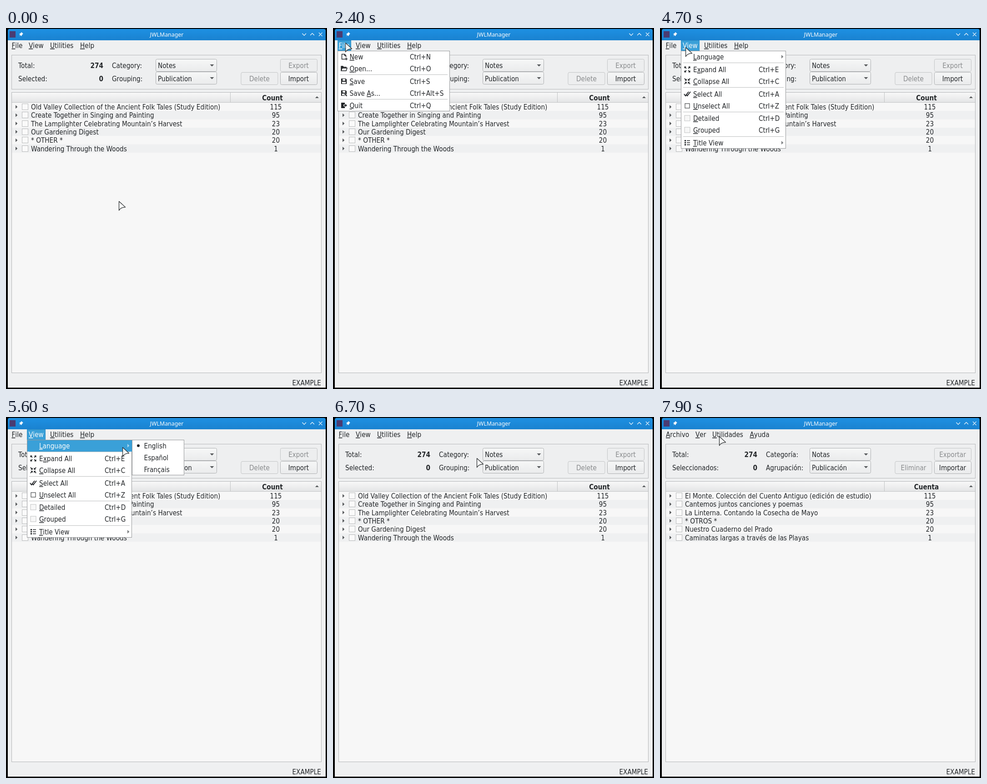
Animation of 706x793 px, one loop 8000 ms. Source, as an HTML page:

```html
<!DOCTYPE html>
<html lang="en">
<head>
<meta charset="utf-8">
<title>JWLManager</title>
<style>
  html, body { margin: 0; width: 100%; height: 100%; overflow: hidden; background: #000; }
  svg { display: block; width: 706px; height: 793px; }
  text { font: 15.2px "DejaVu Sans", sans-serif; fill: #232629; white-space: pre; }
  .bold { font-weight: bold; }
  .dim { fill: #898b8d; }
  .lit, .lit text { fill: #fcfcfc; }
  .title { font: 12.4px "Noto Sans", sans-serif; fill: #fcfcfc; }
  .line { fill: none; stroke: #232629; stroke-width: 1.5; }
  .white { fill: none; stroke: #fcfcfc; stroke-width: 1.2; }
  .off { display: none; }
</style>
</head>
<body>
<svg id="stage" viewBox="0 0 706 793">
  <defs>
    <linearGradient id="bar" x2="0" y2="1"><stop stop-color="#1e90e2"/><stop offset="1" stop-color="#1a82d0"/></linearGradient>
    <linearGradient id="face" x2="0" y2="1"><stop stop-color="#f6f7f7"/><stop offset="1" stop-color="#eaebec"/></linearGradient>
    <linearGradient id="head" x2="0" y2="1"><stop stop-color="#f8f8f8"/><stop offset="1" stop-color="#e4e5e6"/></linearGradient>
  </defs>
</svg>
<script>
const stage = document.getElementById('stage');

// The interface face is a uniformly condensed DejaVu Sans; "_" marks an access key.
const text = (x, y, s, cls = '', anchor = 'start') =>
  `<text transform="translate(${x} ${y}) scale(.9 1)" class="${cls}" text-anchor="${anchor}">${
    s.replace(/_(.)/, '<tspan text-decoration="underline">$1</tspan>')}</text>`;
const rect = (x, y, w, h, fill, stroke = 'none', r = 0) =>
  `<rect x="${x}" y="${y}" width="${w}" height="${h}" rx="${r}" fill="${fill}" stroke="${stroke}"/>`;
const path = (d, attrs = 'fill="#232629"') => `<path d="${d}" ${attrs}/>`;
const at = (x, y, body) => `<g transform="translate(${x} ${y})">${body}</g>`;
const layer = (id, body) => `<g id="${id}" class="off">${body}</g>`;

const rowTop = i => 164 + 18.3 * i;
const rowBase = i => Math.round(rowTop(i) + 15);

function frameWindow() {
  let out = path('M4 27V6Q4 2 8 2H699Q703 2 703 6V27Z', 'fill="url(#bar)"')
    + rect(4, 27, 699, 763, '#eff0f1')
    + rect(8, 7, 13, 14, '#4a3c72')
    + path('M34 9L38 13L36.5 13.6L34.6 16.5L34 18L31.7 15.7L29 18.5L31 15L28.8 13L30.5 12.4L33 10.6Z', 'fill="#fcfcfc"')
    + '<text class="title" x="353.5" y="19" text-anchor="middle">JWLManager</text>'
    + path('M651.5 12L655.8 16.3L660 12M669.3 16L673.6 11.7L677.9 16M688 10.2L695.6 17.8M695.6 10.2L688 17.8', 'class="white"')
    + rect(12.5, 59.5, 681, 75, '#eeeff0', '#b7b9bb')
    + text(214, 88, '274', 'bold', 'end') + text(214, 117, '0', 'bold', 'end');
  for (const y of [69, 97]) {
    out += rect(329.5, y - .5, 134, 27, 'url(#face)', '#aeb0b2', 3)
      + path(`M448.5 ${y + 11}h9l-4.5 4.5z`, 'fill="#55585a"');
  }
  out += rect(603.5, 68.5, 81, 27, '#edeeef', '#c3c5c6', 3)
    + rect(517, 97.5, 81, 27, '#edeeef', '#c3c5c6', 3)
    + rect(603.5, 97.5, 81, 27, 'url(#face)', '#aeb0b2', 3)
    + rect(12.5, 141.5, 681, 616, '#f7f7f7', '#b4b6b8')
    + rect(13, 142, 680, 21, 'url(#head)')
    + path('M13 163.5H693M493.5 142V163', 'stroke="#c2c4c5"')
    + path('M680 154h8l-4-4z', 'fill="#55585a"');
  ['115', '95', '23', '20', '20', '1'].forEach((n, i) => {
    const y = rowTop(i);
    if (i % 2) out += rect(13, y, 680, 18.3, '#eff0f1');
    out += path(`M21 ${y + 5.2}v8l4.3-4z`, 'fill="#55585a"')
      + rect(35.5, Math.round(y + 2) + .5, 13, 13, '#fafafa', '#b9bbbc')
      + text(593.5, rowBase(i), n, '', 'middle');
  });
  return out + text(693, 785, 'EXAMPLE', '', 'end');
}

const titles = rows => rows.map((s, i) => text(55, rowBase(i), s)).join('');

const labels = ({ bar, total, selected, category, grouping, notes, publication, exp, del, imp, count }) =>
  bar.map(([x, s]) => text(x, 44, s)).join('')
  + text(27, 88, total) + text(27, 117, selected)
  + text(233, 88, category) + text(233, 117, grouping)
  + text(334, 88, notes) + text(334, 117, publication)
  + text(643.5, 88, exp, 'dim', 'middle') + text(557.5, 117, del, 'dim', 'middle')
  + text(643.5, 117, imp, '', 'middle') + text(586, 159, count, 'bold', 'middle');

const english = {
  bar: [[12.5, '_File'], [50, '_View'], [97, '_Utilities'], [163, '_Help']],
  total: 'Total:', selected: 'Selected:', category: 'Category:', grouping: 'Grouping:',
  notes: 'Notes', publication: 'Publication', exp: 'Export', del: 'Delete', imp: 'Import', count: 'Count'
};
const spanish = {
  bar: [[13, '_Archivo'], [78, '_Ver'], [115, '_Utilidades'], [197.5, '_Ayuda']],
  total: 'Total:', selected: 'Seleccionados:', category: 'Categoría:', grouping: 'Agrupación:',
  notes: 'Notas', publication: 'Publicación', exp: 'Exportar', del: 'Eliminar', imp: 'Importar', count: 'Cuenta'
};
const englishRows = ['Old Valley Collection of the Ancient Folk Tales (Study Edition)', 'Create Together in Singing and Painting',
  'The Lamplighter Celebrating Mountain’s Harvest', 'Our Gardening Digest', '* OTHER *', 'Wandering Through the Woods'];
const swappedRows = [0, 1, 2, 4, 3, 5].map(i => englishRows[i]);
const spanishRows = ['El Monte. Colección del Cuento Antiguo (edición de estudio)', 'Cantemos juntos canciones y poemas',
  'La Linterna. Contando la Cosecha de Mayo', '* OTROS *', 'Nuestro Cuaderno del Prado',
  'Caminatas largas a través de las Playas'];

// Icons are centred on their own origin.
const floppy = path('M-6-6H4L6-4V6H-6ZM-3-5V-1H3V-5ZM-4 1V5H4V1Z', 'fill="#1b1e20" fill-rule="evenodd"');
const arrow = d => [0, 90, 180, 270].map(a => `<g transform="rotate(${a})">${path(d)}</g>`).join('');
const icons = {
  page: path('M2.5 5.5H-4.5V-5.5H1.5L4.5-2.5V1M1.5-5.5V-2.5H4.5', 'class="line" stroke-width="1"')
    + path('M5 2V8M2 5H8', 'class="line"'),
  folder: path('M-6 5V-5H-2L-1-3H5V-1M-6 5L-3.5-1H7L5 5Z', 'class="line"') + path('M-6-5H-2L-1-2.5H5V-1H-4L-6 3Z'),
  floppy,
  saveAs: floppy + path('M0 1L7 7', 'stroke="#fff" stroke-width="4"') + path('M1 1L6.5 6.5', 'stroke="#1b1e20" stroke-width="2"'),
  quit: path('M-6-6H2V-2H-1V2H2V6H-6Z') + path('M0-1H3V-3.5L7 0L3 3.5V1H0Z'),
  expand: arrow('M6.5-6.5V-2L4.9-3.6L2.8-1.5L1.5-2.8L3.6-4.9L2-6.5Z'),
  collapse: arrow('M1.3-1.3V-5.8L2.9-4.2L5.5-6.8L6.8-5.5L4.2-2.9L5.8-1.3Z'),
  check: path('M-7 0L-4 4L3-5M-2 2L0 4L7-5', 'class="line" style="stroke-width:2"'),
  square: rect(-5, -5, 10, 10, 'none', '#232629'),
  box: rect(-6, -6, 12, 12, '#f7f7f7', '#bfc1c2'),
  list: path('M-6-6h3v3h-3zM-6-1.5h3v3h-3zM-6 3h3v3h-3zM-1-5.3H6V-3.7H-1zM-1-.8H6V.8H-1zM-1 3.7H6V5.3H-1z'),
  dot: '<circle r="3" fill="#232629"/>'
};
const into = (x, y, fill = '#7b7e80') => path(`M${x} ${y - 4}v8l4.3-4z`, `fill="${fill}"`);

// Each item: [centre y, label, shortcut, icon].
function menu(x, w, h, textX, keyX, items, lines) {
  return rect(x + .5, 50.5, w - 1, h - 1, '#fff', '#97999b')
    + lines.map(y => path(`M${x + 5} ${y}.5H${x + w - 5}`, 'stroke="#bcbebf"')).join('')
    + items.map(([y, s, key, icon]) => text(textX, y + 6, s)
      + (key ? text(keyX, y + 6, key) : '')
      + (icon ? at(x + 14, y, icons[icon]) : '')).join('');
}
const glow = (x, y, w, h, body) => `<g class="lit">${rect(x, y, w, h, '#3aa0d8')}${body}</g>`;
const tab = (x, w, textX, s) =>
  glow(x, 27, w, 23, rect(x + .5, 27.5, w - 1, 23, 'none', '#2f8dc4') + text(textX, 44, s, 'lit'));

const fileMenu = tab(10, 30, 12.5, '_File') + menu(10, 247, 133, 36.5, 169, [
  [63, '_New', 'Ctrl+N', 'page'], [89, '_Open...', 'Ctrl+O', 'folder'],
  [117, '_Save', 'Ctrl+S', 'floppy'], [143, 'Save _As...', 'Ctrl+Alt+S', 'saveAs'],
  [170, '_Quit', 'Ctrl+Q', 'quit']], [102, 156]);
const viewMenu = tab(46, 41, 50, '_View') + menu(46, 231, 215, 73, 217, [
  [63, '_Language'], [91, 'E_xpand All', 'Ctrl+E', 'expand'], [117, '_Collapse All', 'Ctrl+C', 'collapse'],
  [145, '_Select All', 'Ctrl+A', 'check'], [171, '_Unselect All', 'Ctrl+Z', 'square'],
  [198, '_Detailed', 'Ctrl+D', 'box'], [224, '_Grouped', 'Ctrl+G', 'box'],
  [252, '_Title View', '', 'list']], [76, 130, 184, 238]) + into(267, 63) + into(267, 252);
const langMenu = menu(277, 115, 78, 303.5, 0,
  [[63, 'English', '', 'dot'], [89, 'Español'], [115, 'Français']], []);

stage.innerHTML += frameWindow()
  + layer('en', labels(english))
  + layer('es', labels(spanish))
  + layer('rows', titles(englishRows))
  + layer('swapped', titles(swappedRows))
  + layer('filas', titles(spanishRows))
  + layer('file', fileMenu)
  + layer('view', viewMenu)
  + layer('langLit', glow(47, 51, 230, 25, text(73, 69, '_Language', 'lit') + into(267, 63, '#a9d6ef')))
  + layer('lang', langMenu)
  + layer('enLit', glow(278, 51, 113, 25, text(303.5, 69, 'English', 'lit') + '<circle cx="291" cy="63" r="3"/>'))
  + layer('esLit', glow(278, 76, 113, 26, text(303.5, 95, 'Español', 'lit')))
  + layer('esDot', '<circle cx="291" cy="89" r="3" fill="#fcfcfc"/>')
  + `<g id="cursor">${path('M.5 .8V20.8Q4.4 13.6 14.6 13.6Z', 'fill="#f5f6f6" fill-opacity=".92" stroke="#26292b" stroke-width="1.2" stroke-linejoin="round"')}</g>`;

// Layers shown from the first time up to the second, in ms.
const spans = {
  en: [0, 6800], es: [6800, 8000], rows: [0, 6700], swapped: [6700, 6800], filas: [6800, 8000],
  file: [1200, 2800], view: [2800, 6700], langLit: [4900, 6700], lang: [5200, 6700],
  enLit: [5700, 5800], esLit: [5800, 6700], esDot: [6500, 6700]
};
// Pointer stops: time, x, y; each holds until the next.
const stops = [[800, 25, 32], [1300, 22, 32], [2400, 27, 32], [2700, 40, 32], [2800, 56, 32], [2900, 67, 32],
  [4700, 56, 42], [4900, 56, 51], [5000, 57, 55], [5500, 140, 58], [5600, 256, 66], [5700, 296, 73],
  [5800, 312, 81], [5900, 317, 86], [6000, 317, 88], [6200, 316, 90],
  [7600, 285, 78], [7700, 218, 58], [7800, 155, 45], [7900, 130, 42]];

function pointer(t) {
  if (t < 800) {
    const u = t / 800, k = u * u * (3 - 2 * u);
    return [248 - 223 * k, 380 - 348 * k];
  }
  return stops.filter(s => s[0] <= t).pop().slice(1);
}

const $ = id => document.getElementById(id);
const start = performance.now();
function draw() {
  const t = Math.floor((performance.now() - start) % 8000 / 100) * 100;
  for (const id in spans) $(id).classList.toggle('off', t < spans[id][0] || t >= spans[id][1]);
  const [x, y] = pointer(t);
  $('cursor').setAttribute('transform', `translate(${Math.round(x)} ${Math.round(y)})`);
  requestAnimationFrame(draw);
}
draw();
</script>
</body>
</html>
```
